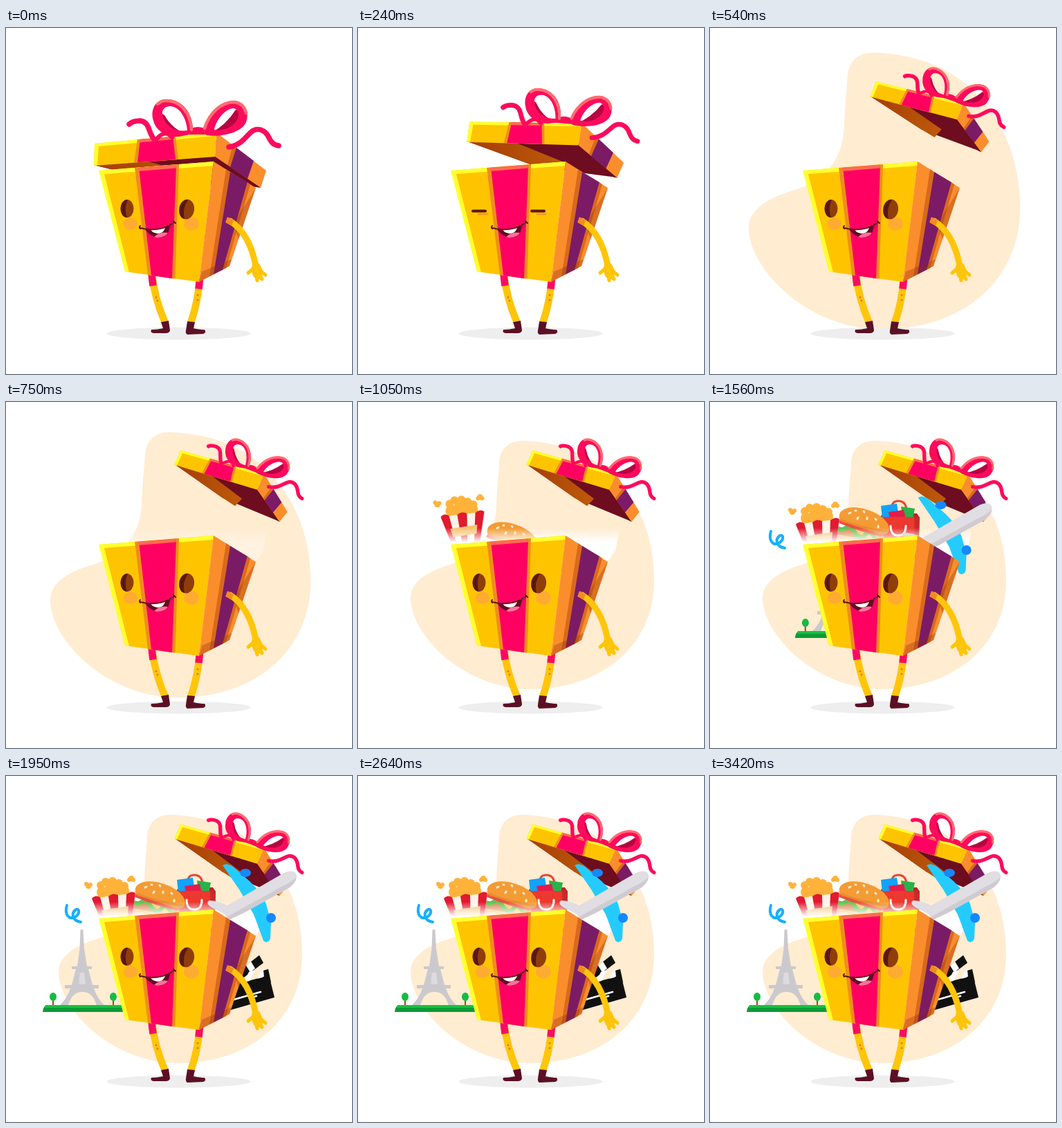
An HTML page for the animation above (4.05 s loop, 500 px wide and 500 px high).

```html
<!DOCTYPE html>
<html>
<head>
<meta charset="utf-8">
<title>Gift box</title>
<style>
html, body { margin: 0; width: 100%; height: 100%; overflow: hidden; background: #fff; }
svg { display: block; width: 100vw; height: 100vh; }
.line { fill: none; stroke-linecap: round; stroke-linejoin: round; }
</style>
</head>
<body>
<svg viewBox="0 0 500 500">
<defs>
  <linearGradient id="mist" gradientUnits="userSpaceOnUse" x1="0" y1="182" x2="0" y2="203">
    <stop offset="0" stop-color="#fff" stop-opacity="0"/><stop offset="1" stop-color="#fff"/>
  </linearGradient>
  <linearGradient id="inner"><stop offset="0" stop-color="#a63c06"/><stop offset="1" stop-color="#bd5a0a"/></linearGradient>
</defs>

<path id="blob" fill="#ffecd1" d="M204 88C205 66 220 55 240 56C300 59 340 78 370 108C410 150 428 200 428 258C428 350 355 415 248 415C150 414 76 335 76 283C76 258 105 243 136 234C180 221 199 190 200 148C201 122 203 108 204 88Z"/>
<ellipse cx="249.500" cy="441.500" rx="104" ry="9" fill="#eee"/>

<g id="lid">
  <path fill="#6d0d1f" d="M127 198L243 227L368 230L302 184Z"/>
  <path fill="url(#inner)" d="M127 198L243 227L272 233L280 214L196 190Z"/>
  <path fill="#ffc400" d="M128 167L304 151L302 186L127 199Z"/>
  <path fill="#ffff2e" d="M128 167L304 151L303 156L134 171L132 198L127 199Z"/>
  <path fill="#ef8d1d" d="M190 161L245 156.500L249 190L185 194.500Z"/>
  <path fill="#ff0062" d="M194 161L241 157L245 190L190 194.200Z"/>
  <path fill="#ff6b50" d="M193 161L241 157L241.600 161L192.500 165.500Z"/>
  <path fill="#fb8e2c" d="M304 151L376 206L368 231L302 186Z"/>
  <path fill="#d9691d" d="M328 169L334 174L326 202L320 198Z"/>
  <path fill="#7b1b66" d="M333 173L358 192L349 218L324 201Z"/>
  <path fill="#6d0d1f" d="M302 186L368 231L362 230L303 194Z"/>
  <g class="line" stroke="#ff0a5c">
    <path stroke-width="7.500" d="M214 161C205 150 208 136 194 134Q183 134 178 139M322 172C349 168 350 142 368 147C383 152 378 168 394 170"/>
    <path stroke-width="6" d="M218 160Q230 146 240 158"/>
  </g>
  <g fill="#ff0a5c" fill-rule="evenodd">
    <path fill="#b80342" d="M222 122Q220 150 262 154Q240 146 229 126ZM340 120Q338 148 296 152Q318 140 332 118Z"/>
    <path d="M270 153C272 125 256 103 232 103C216 103 208 118 213 134C217 150 234 158 250 157ZM262 148C261 132 252 114 238 113C226 113 223 122 229 133C235 145 248 150 262 148Z"/>
    <path d="M284 150C290 122 310 105 330 105C346 107 352 122 347 136C340 152 310 158 290 155ZM301 147C304 131 318 116 329 116C338 118 338 129 331 137C324 145 311 149 301 147Z"/>
    <path d="M264 154Q264 143 278 143Q292 144 292 154Z"/>
  </g>
  <path class="line" stroke="#ff6c70" stroke-width="4.500" d="M268 147C267 123 252 105 232 105Q224 105 219 110M287 145C294 122 312 107 330 107Q344 109 347 123"/>
</g>

<g id="clapper">
  <path fill="#111" d="M325 303L380 288L388 320L318 340ZM334 284L366 259L372 270L340 294Z"/>
  <path fill="#fff" d="M344 298L351 283L359 281L352 296ZM363 293L370 279L376 279L371 291ZM347 274L354 268L360 278L353 284Z"/>
  <path fill="#111" d="M372 281L379 279L383 298L374 300Z"/>
  <path class="line" stroke="#fff" stroke-width="2.500" d="M326 324L368 312M354 320L362 318"/>
</g>

<g id="tower">
  <path fill="#cacace" d="M107.500 222H111.500L113 250L117 275H124V279H119L125 302H134V307H127Q132 322 143 332H131Q126 312 110 312Q95 312 90 332H77Q88 322 93 307H85V302H95L101 279H95V275H103L106.500 250Z"/>
  <path fill="#fff" d="M107 284H113L115 301H105Z" opacity=".35"/>
  <path fill="#0a9c35" d="M53 341Q54 331 60 331H180V341Z"/>
  <path fill="#17c03f" d="M57 331H180V335H56Z"/>
  <path stroke="#a6452c" stroke-width="2" d="M68 318V331M155 318V331"/>
  <g fill="#12bd40"><ellipse cx="68" cy="319" rx="5" ry="6"/><ellipse cx="155" cy="319" rx="5" ry="6"/></g>
</g>

<g id="bag">
  <path class="line" stroke="#e44735" stroke-width="3" d="M262 156Q262 143 272 143Q283 143 284 156"/>
  <path fill="#b92425" d="M246 166L250 161H299L303 167Z"/>
  <path fill="#12a3fa" d="M247 150L270 147L273 166L249 168Z"/>
  <path fill="#27b34a" d="M276 151L296 154L293 169L278 167Z"/>
  <path fill="#e51c49" d="M258 159L280 156L283 169H260Z"/>
  <path fill="#ec382f" d="M245 166H303L301 225H247Z"/>
  <path fill="#cb2929" d="M295 166H303L301 225H297Z"/>
  <path class="line" stroke="#fff" stroke-width="3" d="M261 179Q261 193 272 193Q283 193 283 179"/>
</g>

<g id="burger">
  <path fill="#f4b566" d="M180 186L250 203L240 226L185 220Z"/>
  <path fill="#d9864a" d="M185 180L251 194L247 203L183 191Z"/>
  <path fill="#ffc94a" d="M188 174L250 192L230 199Z"/>
  <path class="line" stroke="#5fc250" stroke-width="6" d="M183 181Q189 187 196 182T210 189T224 192T238 196"/>
  <path class="line" stroke="#ee4f42" stroke-width="5" d="M188 173Q215 184 246 192"/>
  <path fill="#f49b35" d="M187 168C184 153 206 149 225 155C250 162 263 178 258 188Q254 193 242 190Q214 179 191 173Q187 171 187 168Z"/>
  <path fill="#e88a2a" d="M187 168Q215 180 259 186Q256 193 242 190Q214 179 191 173Z"/>
  <g class="line" stroke="#fff0cd" stroke-width="3"><path d="M201 161L203 160M213 169L214 167M222 158L223 159M227 167V169M239 169L240 170M243 179V181M210 157H211"/></g>
</g>

<g id="popcorn">
  <g id="kernels" fill="#ffb23a"></g>
  <path fill="#fff4e8" d="M124 177L187 169L179 226L144 226Z"/>
  <path fill="#e3192f" d="M124 177Q129 171 136 175L150 226H144ZM148 174Q154 168 162 172L163 226H157ZM174 171Q181 165 187 169L179 226H172Z"/>
  <path fill="#f8c272" d="M138 194L177 188L176 201L142 206Z"/>
</g>

<path id="squiggle" class="line" stroke="#12b2ff" stroke-width="4" d="M88 187C84 200 91 208 99 204C108 199 106 191 101 193C94 198 95 209 108 211"/>

<path id="glow" fill="url(#mist)" d="M122 180H379L372 215L361 231L300 220L135 220Z"/>

<g id="plane">
  <path fill="#25cbff" d="M313 129Q319 125 328 131L352 152Q369 168 376 185L383 212L382 235Q378 243 372 238L358 200L337 164Z"/>
  <g fill="#1688fa"><ellipse cx="346" cy="140" rx="8" ry="6"/><ellipse cx="383" cy="205" rx="7" ry="7"/></g>
  <path fill="#e0dee2" d="M420 143C418 136 408 136 400 141L320 187Q302 179 293 180Q288 184 297 190L314 198L322 208L345 197L410 161Q420 153 420 143Z"/>
  <path fill="#d0cbd1" d="M420 146Q413 153 402 158L320 203L322 208L345 197L410 161Q419 154 420 146Z"/>
</g>

<!-- legs -->
<g class="line" stroke-width="10.500" style="stroke-linecap:butt">
  <path stroke="#ffc50a" d="M210.500 354Q215 392 230 426M280 362Q277 398 267 426"/>
  <path stroke="#ff0a62" d="M210.500 354Q211 363 212.500 372.500M280 362L278.500 377"/>
</g>
<g fill="#5c1024">
  <path d="M224 425L235 423L237 437Q236 441 231 441H213Q208 440 210 436Q218 436 227 434Z"/>
  <path d="M262 424L273 425L271 434Q281 436 287 436Q290 440 285 442L262 443Q259 441 260 437Z"/>
</g>
<g fill="#dc7b13"><circle cx="217" cy="389" r="1.500"/><circle cx="219" cy="394" r="1.500"/><circle cx="277" cy="386" r="1.500"/><circle cx="277" cy="393" r="1.500"/></g>

<!-- body -->
<path fill="#ffc400" d="M135 206L300 193L279 367L172 352Z"/>
<path fill="#ffff2e" d="M134 206L300 193L299 199L142 211L178 353L172 352Z"/>
<path fill="#ef8d1d" d="M186 202L250 197L244.500 362.500L205 357Z"/>
<path fill="#ff0062" d="M192 202L246 198L240 362L210 357.500Z"/>
<path fill="#ff6b50" d="M190 202L246 197.500L245.800 202.500L191.500 207Z"/>
<path fill="#fb8e2c" d="M300 193L361 231L323 344L279 367Z"/>
<path fill="#d9691d" d="M318 204L325 209L302 355L294 359Z"/>
<path fill="#7b1b66" d="M324 208L349 223L314 349L300 356Z"/>
<path fill="#d9691d" d="M349 223L353 226L318 347L313 349.500Z"/>
<path fill="#8a2a10" opacity=".3" d="M361 231L329 282L336 306ZM279 367L283 352L326 334L323 344Z"/>

<!-- face -->
<g id="open">
  <ellipse cx="180" cy="283" rx="10" ry="9" fill="#ffab32"/>
  <ellipse cx="268" cy="283" rx="11" ry="10" fill="#ffab32"/>
  <g fill="#8f3e0a"><ellipse cx="175" cy="261" rx="9.500" ry="13"/><ellipse cx="261" cy="262" rx="11" ry="14.500" transform="rotate(8 261 262)"/></g>
  <g fill="#5a1712"><path d="M176 248C163 248 162 273 175 274Q170 261 176 248Z"/><path d="M263 248C249 248 246 274 258 276Q254 262 263 248Z"/></g>
</g>
<g id="shut" class="line" stroke-width="4">
  <path stroke="#f39a22" stroke-width="3" d="M174 269H187M259 269H271"/>
  <path stroke="#5a1712" d="M166 264.500H184M251 264.500H269"/>
</g>
<path fill="#650d22" d="M201 291Q221 294 238 284L234 297Q229 303 218 303Q209 301 201 291Z"/>
<path fill="#fff" d="M209 291.500Q220 292 230 288.500Q228 297 219 297Q212 296 209 291.500Z"/>
<path fill="#ff6f9e" d="M214 302Q222 294 234 296Q230 303 218 303Z"/>
<path class="line" stroke="#5a1712" stroke-width="2" d="M194 286Q192 288 194 290M194 289Q222 296 243 281M242 279L245 282"/>

<!-- arm -->
<path class="line" stroke="#ffc50a" stroke-width="9" d="M324 279Q352 297 361 344"/>
<path fill="#f18c1e" d="M320 273L329 278L326 286L317 281Z"/>
<path fill="#ffc50a" d="M356 341L366 340L372 353L368 364L358 360L354 350Z"/>
<path class="line" stroke="#ffc50a" stroke-width="5" d="M358 347L350 354M360 353L363 365M364 352L370 363M366 349L375 357"/>
</svg>

<script>
const LOOP = 4050;
const $ = id => document.getElementById(id);
const move = (id, value) => $(id).setAttribute('transform', value);
const show = (id, on) => $(id).style.display = on ? '' : 'none';
const clamp = x => Math.max(0, Math.min(1, x));
const sine = p => (1 - Math.cos(Math.PI * p)) / 2;
const out = p => 1 - (1 - p) ** 2;
const mix = (a, b, p) => a + (b - a) * p;

// Eased value at t for three [time, value] keys: enter, overshoot, settle.
function spring(t, [t0, v0], [t1, v1], [t2, v2], first = sine) {
  return t < t1
    ? mix(v0, v1, first(clamp((t - t0) / (t1 - t0))))
    : mix(v1, v2, sine(clamp((t - t1) / (t2 - t1))));
}

const zoom = (x, y, s) => `translate(${x} ${y}) scale(${s}) translate(${-x} ${-y})`;

const kernels = [[119, 159, 4], [116, 156, 3], [122, 157, 3], [181, 148, 4], [178, 150, 3], [184, 150, 3],
  [137, 158, 6], [144, 153, 6], [154, 152, 6], [163, 155, 6], [171, 159, 6],
  [139, 168, 8], [154, 166, 12], [170, 166, 8]];
$('kernels').innerHTML = kernels.map(([x, y, r]) => `<circle cx="${x}" cy="${y}" r="${r}"/>`).join('');

const blinks = [240, 2280, 2520, 3300];

function draw(t) {
  const lift = sine(clamp(t / 675));
  move('lid', `translate(${mix(304, 373, lift)} ${mix(151, 104, lift)}) rotate(${21 * lift}) scale(${mix(1, .71, lift)}) translate(-304 -151)`);

  show('blob', t > 300);
  move('blob', zoom(252, 235, spring(t, [300, 0], [590, 1.147], [900, 1], out)));

  $('glow').style.opacity = clamp((t - 650) / 300);

  show('popcorn', t > 840);
  const pop = spring(t, [840, 75], [1080, -14], [1300, 0]);
  move('popcorn', `translate(${Math.min(0, pop) * .42} ${pop})`);

  show('burger', t > 880);
  move('burger', `translate(0 ${spring(t, [880, 70], [1180, -10], [1350, 0])})`);

  show('bag', t > 1100);
  move('bag', `translate(0 ${spring(t, [1100, 70], [1330, -8], [1480, 0])})`);

  show('squiggle', t > 1250);
  move('squiggle', zoom(97, 199, spring(t, [1250, 0], [1430, 1.15], [1540, 1])));

  show('plane', t > 1350);
  const left = 1 - out(clamp((t - 1350) / 318));
  move('plane', `translate(${-110 * left} ${80 * left})`);

  show('tower', t > 1450);
  move('tower', `translate(${spring(t, [1450, 114], [1740, -24], [1950, 0])} 0)`);

  show('clapper', t > 1600);
  move('clapper', `translate(${spring(t, [1600, -72], [1800, 8], [1950, 0])} 0)`);

  const shut = blinks.some(b => t >= b && t < b + 120);
  show('open', !shut);
  show('shut', shut);
}

const start = performance.now();
function tick() {
  draw((performance.now() - start) % LOOP);
  requestAnimationFrame(tick);
}
tick();
</script>
</body>
</html>
```
